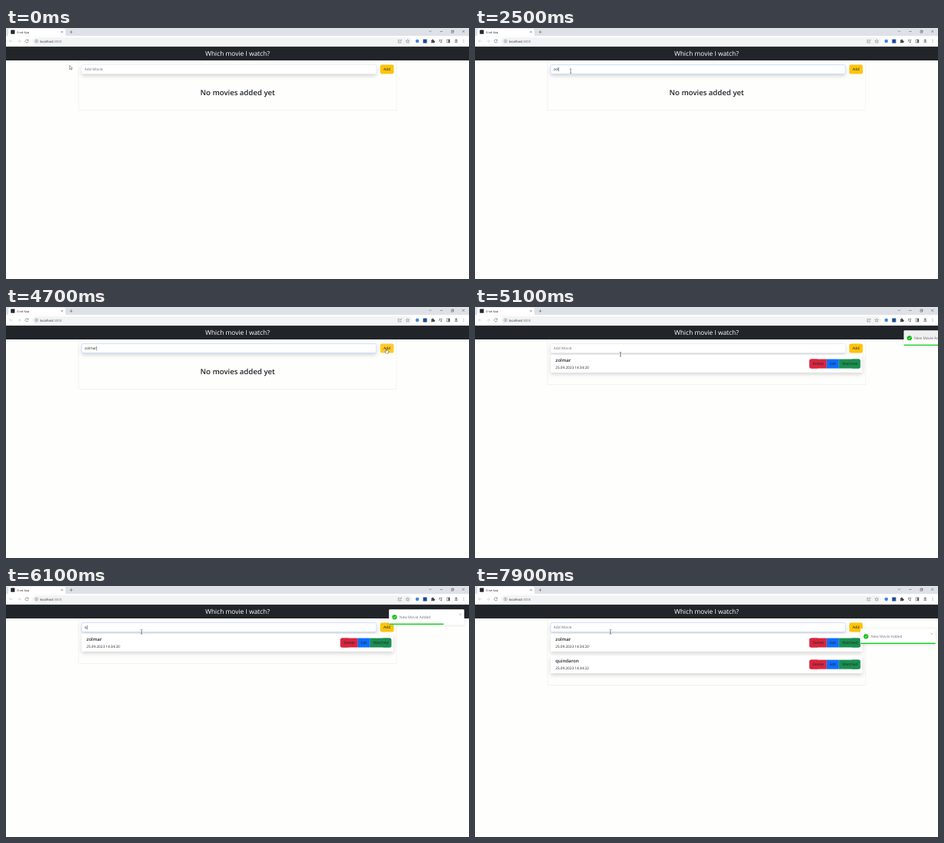
Write an HTML page that moves like this. It is 600x325 px and loops after 8 s.

```html
<!DOCTYPE html>
<html lang="en">
<head>
<meta charset="utf-8">
<title>Crud App</title>
<style>
html, body { margin: 0; width: 100%; height: 100%; overflow: hidden; background: #fefefd; }
svg { display: block; width: 100vw; height: 100vh; }
text { font: 4.8px "Open Sans", "Noto Sans", sans-serif; fill: #212529; text-rendering: geometricPrecision; white-space: pre; }
.mid { text-anchor: middle; }
.line { fill: none; stroke: #4a4d51; stroke-width: .5; }
.bold { font-weight: 600; }
</style>
</head>
<body>
<svg viewBox="0 0 600 325" xmlns="http://www.w3.org/2000/svg">
  <defs>
    <filter id="shade" x="-5%" y="-60%" width="110%" height="260%">
      <feDropShadow dx="0" dy="2.5" stdDeviation="2.4" flood-color="#000" flood-opacity=".16"/>
    </filter>
    <filter id="soft" x="-10%" y="-50%" width="120%" height="200%">
      <feDropShadow dx="0" dy=".4" stdDeviation="1.6" flood-color="#000" flood-opacity=".16"/>
    </filter>
    <clipPath id="round"><rect width="97.5" height="20" rx="1.25"/></clipPath>
  </defs>
  <rect width="600" height="325" fill="#fefefd"/>

  <!-- browser window -->
  <rect width="600" height="10.5" fill="#dee1e6"/>
  <path d="M1 10.5Q3 10.5 3 8.5V2.8Q3 .8 5 .8H75Q77 .8 77 2.8V8.5Q77 10.5 79 10.5Z" fill="#fff"/>
  <rect y="10.5" width="600" height="13.7" fill="#fff"/>
  <rect x="6.2" y="2.6" width="5.2" height="5.2" rx=".6" fill="#26282c"/>
  <text x="14" y="6.6" style="font-size:3.65px">Crud App</text>
  <path class="line" d="M71.3 4l2.4 2.4m0-2.4l-2.4 2.4M82.6 5.2h3.8m-1.9-1.9v3.8"/>
  <path class="line" d="M548.2 3.6l1.5 1.5 1.5-1.5M562.4 4.5h3.4M577 3.9h2.4v2.4H577ZM577.7 3.9v-.8h2.4v2.4h-.7M591.2 2.9l3 3m0-3l-3 3"/>
  <path class="line" style="stroke:#b9bcc0" d="M8.8 17H4.6m1.9-1.9L4.6 17l1.9 1.9M15 17h4.2m-1.9-1.9l1.9 1.9-1.9 1.9"/>
  <path class="line" d="M28.6 15.8A2 2 0 1 0 28.9 17.5M28.9 14.7v1.5h-1.5"/>
  <rect x="34" y="12.3" width="492" height="9.4" rx="4.7" fill="#f1f3f4"/>
  <circle class="line" cx="39.5" cy="17" r="1.9" style="stroke-width:.4"/>
  <path class="line" d="M39.5 16.7v1.3m0-2.2v.5"/>
  <text x="44" y="18.5" style="font-size:4.18px">localhost<tspan fill="#70757a">:3000</tspan></text>
  <path class="line" style="stroke-width:.4" d="M510 15.5h-1.7v3.6h3.8v-1M509.8 17.8q.3-2 2.7-2m-1-1.1l1.1 1.1-1.1 1.1"/>
  <path class="line" style="stroke-width:.4" d="M520.5 14.8l.7 1.5 1.6.2-1.2 1.1.3 1.6-1.4-.8-1.4.8.3-1.6-1.2-1.1 1.6-.2Z"/>
  <circle cx="533" cy="17" r="2.3" fill="#3f8ae0"/>
  <rect x="540.5" y="14.6" width="5" height="5" fill="#1c4a94"/>
  <path d="M551 15.7h1.3a.8.8 0 1 1 1.5 0h1.2v1.3a.8.8 0 1 1 0 1.5v.8h-4v-1a.8.8 0 0 0 0-1.5Z" fill="#45484c"/>
  <path class="line" d="M561 15.2h3.2m-3.2 1.3h2.4M561 17.8h1.4M564.4 18.6v-3.2h1.2"/>
  <circle cx="563.8" cy="18.5" r=".7" fill="#4a4d51"/>
  <rect class="line" x="571.2" y="15" width="3.8" height="4"/>
  <rect x="573.2" y="15" width="1.8" height="4" fill="#4a4d51"/>
  <circle cx="583.4" cy="17" r="2.8" fill="#e6e7e9"/>
  <circle cx="583.4" cy="15.8" r="1" fill="#55595e"/>
  <path d="M581.2 18.6q2.2-2.2 4.4 0Z" fill="#55595e"/>
  <g fill="#4a4d51"><circle cx="593" cy="15.3" r=".45"/><circle cx="593" cy="17" r=".45"/><circle cx="593" cy="18.7" r=".45"/></g>

  <!-- page -->
  <rect id="box" x="94" y="41" width="412" fill="none" stroke="#e6e8ea" stroke-width=".5"/>
  <rect y="24.1" width="600" height="17.9" fill="#212529"/>
  <text class="mid" x="300" y="36.4" style="font-size:8.4px;fill:#fff">Which movie I watch?</text>
  <rect id="field" x="98" y="47.6" width="382" height="11.9" rx="1.9" fill="#fff" stroke-width=".4" filter="url(#shade)"/>
  <text id="entry" x="101.8" y="55.2"></text>
  <rect id="caret" y="51" width=".4" height="5.2" fill="#111"/>
  <rect id="add" x="485" y="47.5" width="17.5" height="12" rx="1.9"/>
  <text class="mid" x="493.7" y="55.2">Add</text>
  <text id="empty" class="mid bold" x="300.2" y="86.9" style="font-size:9.55px">No movies added yet</text>
  <g id="list"></g>
  <g id="toasts"></g>

  <g id="arrow"><path d="M0 0V5L1.2 4 2 5.8 2.8 5.4 2 3.7H3.6Z" fill="#fff" stroke="#222" stroke-width=".4"/></g>
  <g id="beam"><path class="line" style="stroke:#222" d="M-1.1-2.7H-.3L0-2.4.3-2.7H1.1M0-2.4V2.4M-1.1 2.7H-.3L0 2.4.3 2.7H1.1"/></g>
  <g id="hand"><path d="M-.5.3Q0-.4.5.3V2.3L2.4 2.8Q3 3 2.8 3.8L2.3 6H-.6L-2 3.8Q-1.8 2.9-.5 3.6Z" fill="#fff" stroke="#222" stroke-width=".4"/></g>
</svg>
<script>
const LOOP = 8000, STEP = 100;
const $ = id => document.getElementById(id);
const show = (el, on) => el.setAttribute('display', on ? 'inline' : 'none');
const move = (el, x, y) => el.setAttribute('transform', `translate(${x} ${y})`);

const movies = [
  { name: 'zolmar', stamp: '25.09.2023 14:34:20', at: 4854, keys: [1900, 2100, 2400, 2700, 2900, 3300] },
  { name: 'quindaron', stamp: '25.09.2023 14:34:22', at: 7375, keys: [6000, 6350, 6500, 6650, 6750, 6900, 7050, 7150, 7280] }
];
const clicks = [1200, 5600];

// pointer: time, x, y, ease-out power of the way there
const path = [
  [0, 82.5, 48.5, 1], [300, 82.5, 48.5, 1], [950, 124, 55.7, 2], [3750, 124, 55.7, 1],
  [4100, 392.5, 62.3, 1.1], [4600, 493, 54, 2], [4854, 493, 54, 1],
  [5100, 188.5, 61.2, 1.5], [5500, 175.6, 59.4, 2], [LOOP, 175.6, 59.4, 1]
];

const button = (x, w, fill, label) =>
  `<rect x="${x}" y="67.5" width="${w}" height="12" fill="${fill}"/>
   <text class="mid" x="${x + w / 2}" y="75.2">${label}</text>`;

const card = (m, i) => `<g transform="translate(0 ${i * 28.1})">
  <rect x="98" y="61.8" width="404" height="23" rx="1.5" fill="#fff" filter="url(#shade)"/>
  <text class="bold" x="104.3" y="71" style="font-size:6px">${m.name}</text>
  <text x="104.3" y="80.2" style="font-size:4.67px">${m.stamp}</text>
  <rect x="433.2" y="67.5" width="12" height="12" rx="1.9" fill="#d8263f"/>
  <rect x="487.5" y="67.5" width="12" height="12" rx="1.9" fill="#1a8f50"/>
  ${button(435.2, 20.6, '#d8263f', '')}${button(455.8, 16, '#0d6efd', 'Edit')}${button(471.8, 25.7, '#1a8f50', '')}
  <text class="mid" x="444.8" y="75.2">Delete</text><text class="mid" x="485.8" y="75.2">Watched</text></g>`;

const toast = () => `<g><rect width="97.5" height="20" rx="1.25" fill="#fff" filter="url(#soft)"/>
  <g clip-path="url(#round)"><rect class="bar" y="18.4" height="1.6" fill="#0fcc18"/></g>
  <circle cx="7.3" cy="10" r="3.1" fill="#0abb12"/>
  <path d="M5.7 10.1l1.2 1.2 2-2.5" fill="none" stroke="#fff" stroke-width=".8"/>
  <text x="13.6" y="11.7" style="fill:#757575">New Movie Added</text>
  <path class="line" style="stroke:#888;stroke-width:.4" d="M91.4 5.4l2.4 2.4m0-2.4l-2.4 2.4"/></g>`;

$('list').innerHTML = movies.map(card).join('');
$('toasts').innerHTML = movies.map(toast).join('');
const cards = [...$('list').children], toasts = [...$('toasts').children];

const clamp = u => Math.min(1, Math.max(0, u));
const out = (u, k) => 1 - Math.pow(1 - clamp(u), k);
const mix = (a, b, u) => a + (b - a) * u;

// value along [position, value] stops, each stretch eased by f
function along(stops, p, f) {
  let i = 1;
  while (i < stops.length - 1 && p > stops[i][0]) i++;
  const [a, b] = [stops[i - 1], stops[i]];
  return mix(a[1], b[1], f(clamp((p - a[0]) / (b[0] - a[0]))));
}

const PX = 600 / 1920, SLIDE = 700, STAY = 2000;
const slideIn = [[0, 3000], [.6, -25], [.75, 10], [.9, -5], [1, 0]];
const slideOut = [[0, 0], [.2, -20], [1, 2000]];

function drawToast(el, i, t) {
  const age = t - movies[i].at, end = SLIDE + STAY, leaving = age > end;
  show(el, age >= 0 && age < end + SLIDE);
  if (age < 0) return;
  const p = clamp((leaving ? age - end : age) / SLIDE);
  const dx = leaving
    ? along(slideOut, p, u => mix(out(u, 2), u * u * (3 - 2 * u), .5))
    : along(slideIn, p, u => out(u, 3));
  move(el, 496.25 + dx * PX, 30.25 + i * 25);
  el.setAttribute('opacity', leaving ? 1 - clamp((p - .2) / .8) : out(p / .6, 3));
  el.querySelector('.bar').setAttribute('width', 97.5 * (1 - clamp((age - SLIDE) / STAY)));
}

function drawPointer(t) {
  let i = 1;
  while (i < path.length - 1 && t > path[i][0]) i++;
  const a = path[i - 1], b = path[i], u = out((t - a[0]) / (b[0] - a[0]), b[3]);
  const x = mix(a[1], b[1], u), y = mix(a[2], b[2], u);
  const inside = (l, r, bottom) => x > l && x < r && y > 47.5 && y < bottom;
  const onAdd = inside(485, 502.5, 59.5), onField = inside(98, 480, 61.5);
  show($('hand'), onAdd);
  show($('beam'), onField);
  show($('arrow'), !onAdd && !onField);
  ['hand', 'beam', 'arrow'].forEach(id => move($(id), x, y));
  $('add').setAttribute('fill', onAdd ? '#ffca2c' : '#fcc40c');
}

function drawField(t) {
  const movie = movies.find(m => t < m.at);
  const typed = movie ? movie.name.slice(0, movie.keys.filter(k => k <= t).length) : '';
  const focus = t >= clicks[0] && t < 4750 || t >= clicks[1];
  const entry = $('entry');
  entry.textContent = typed || 'Add Movie';
  entry.style.fill = typed ? '#212529' : '#6c757d';
  $('field').setAttribute('stroke', focus ? '#86b7fe' : '#d5dade');
  const events = [...clicks, ...movies.flatMap(m => [...m.keys, m.at])];
  const last = Math.max(0, ...events.filter(e => e <= t));
  show($('caret'), focus && (t - last) % 1000 < 500);
  $('caret').setAttribute('x', 101.8 + (typed ? entry.getComputedTextLength() + .2 : 0));
}

function draw(t) {
  const count = movies.filter(m => t >= m.at).length;
  show($('empty'), !count);
  cards.forEach((c, i) => show(c, i < count));
  $('box').setAttribute('height', [106.4, 100.3, 128.4][count] - 41);
  drawField(t);
  toasts.forEach((el, i) => drawToast(el, i, t));
  drawPointer(t);
}

function tick() {
  draw(Math.floor(performance.now() % LOOP / STEP) * STEP);
  requestAnimationFrame(tick);
}
tick();
</script>
</body>
</html>
```
